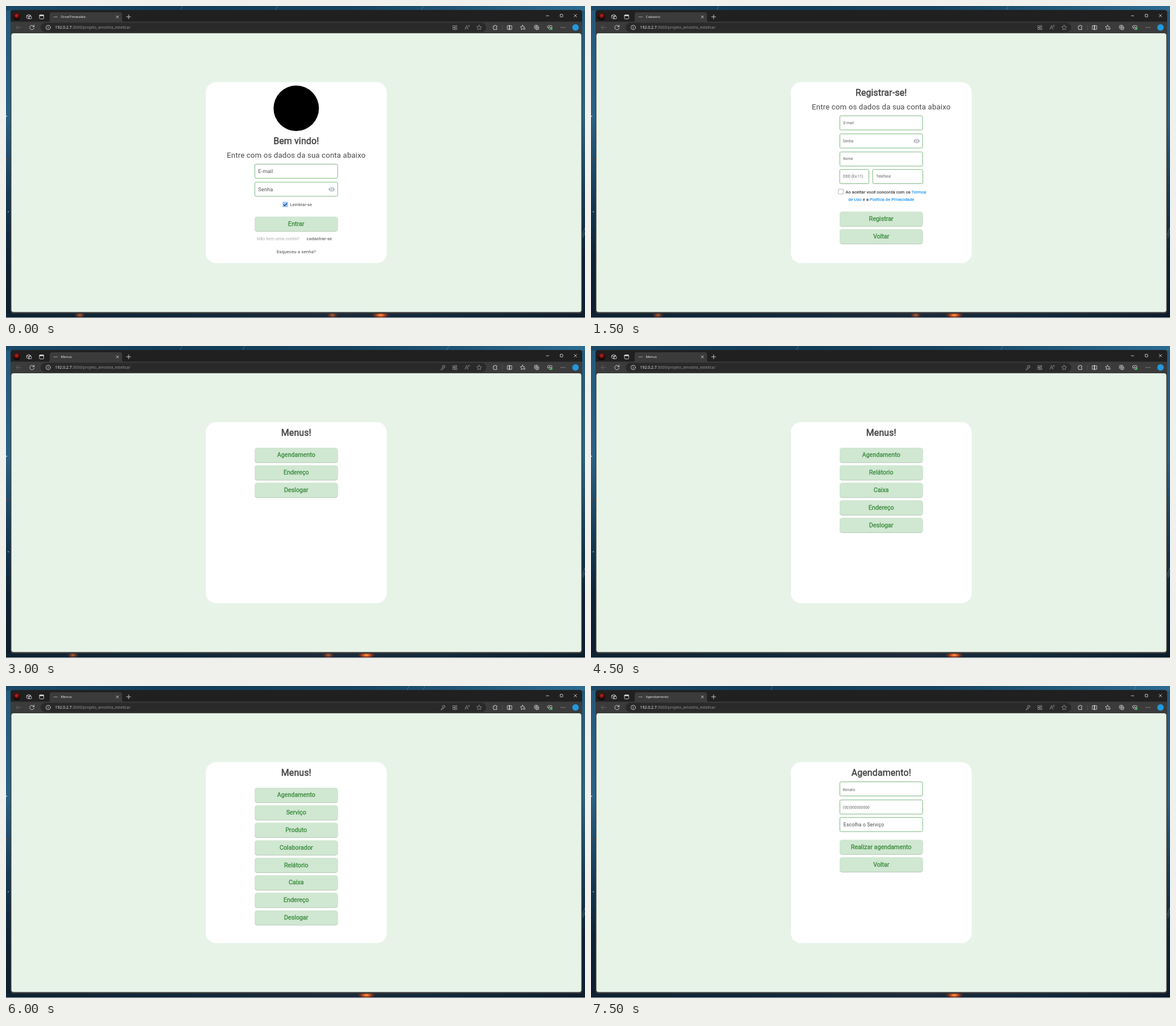
Write an HTML page that moves like this. It is 1020 by 549 pixels and loops after 9000 ms.

```html
<!DOCTYPE html>
<html lang="pt-BR">
<head>
<meta charset="utf-8">
<title>Agendamento</title>
<style>
  html, body { margin: 0; width: 100%; height: 100%; overflow: hidden; background: #0d2233; }
  svg { display: block; width: 100%; height: 100%; }
  text { font-family: Roboto, sans-serif; fill: currentColor; white-space: pre; }
  .ui text, text.ui { font-family: "Open Sans", "Noto Sans", sans-serif; }
  .bold { stroke: currentColor; stroke-width: .032em; stroke-linejoin: round; }
  .mid { text-anchor: middle; }
  .title { font-size: 15.94px; letter-spacing: .133px; color: #444; }
  .sub { font-size: 13.28px; letter-spacing: .133px; color: #4a4a4a; }
  .btn { font-size: 10.625px; letter-spacing: .053px; color: #388a3c; }
  .label { font-size: 9.3px; letter-spacing: .14px; color: #555; }
  .select { font-size: 8.5px; letter-spacing: .266px; color: #444; }
  .small { font-size: 6.375px; letter-spacing: .15px; color: #5c5c5c; }
  .value { font-size: 6.375px; letter-spacing: .26px; color: #5c5c5c; }
  .note { font-size: 7.44px; letter-spacing: .133px; color: #444; }
  .link { font-size: 7.97px; letter-spacing: .06px; color: #4a4a4a; }
  .blue { color: #2196f3; }
  .tab { font-size: 6.1px; color: #f2f2f2; }
  .icon { fill: none; stroke: #d8d8d8; stroke-width: .9; stroke-linecap: round; stroke-linejoin: round; }
  .dim { stroke: #8e8e8e; }
  .scene { visibility: hidden; animation: show 9s step-end infinite; animation-delay: calc(var(--i) * 1.5s); }
  @keyframes show {
    0% { visibility: visible; }
    16.666%, 100% { visibility: hidden; }
  }
</style>
</head>
<body>
<svg viewBox="0 0 1020 549" preserveAspectRatio="none">
  <defs>
    <linearGradient id="side" x2="0" y2="1">
      <stop offset="0" stop-color="#24597c"/>
      <stop offset=".35" stop-color="#2a6285"/>
      <stop offset=".6" stop-color="#173c58"/>
      <stop offset=".8" stop-color="#0d2336"/>
      <stop offset="1" stop-color="#0d1d2c"/>
    </linearGradient>
    <linearGradient id="sky">
      <stop offset="0" stop-color="#1b4a69"/>
      <stop offset=".3" stop-color="#123c58"/>
      <stop offset=".6" stop-color="#15435f"/>
      <stop offset="1" stop-color="#2c6c92"/>
    </linearGradient>
    <linearGradient id="ground">
      <stop offset="0" stop-color="#0e2231"/>
      <stop offset=".3" stop-color="#10283a"/>
      <stop offset=".55" stop-color="#1b2a39"/>
      <stop offset=".75" stop-color="#122a3c"/>
      <stop offset="1" stop-color="#0c1d2b"/>
    </linearGradient>
    <radialGradient id="fire">
      <stop offset="0" stop-color="#ffae4a"/>
      <stop offset=".35" stop-color="#d4511f"/>
      <stop offset="1" stop-color="#6b2216" stop-opacity="0"/>
    </radialGradient>
    <radialGradient id="avatar" cy=".35">
      <stop offset="0" stop-color="#d02a20"/>
      <stop offset=".45" stop-color="#7d1512"/>
      <stop offset="1" stop-color="#120708"/>
    </radialGradient>
  </defs>

  <rect width="1020" height="549" fill="url(#side)"/>
  <rect width="1020" height="8" fill="url(#sky)"/>
  <rect y="540" width="1020" height="9" fill="url(#ground)"/>
  <g id="wall"></g>
  <rect y="548.2" width="1020" height=".8" fill="#e6e9eb"/>

  <!-- browser window -->
  <rect x="8" y="7" width="1007" height="534" rx="4.5" fill="#3b3b3b"/>
  <path d="M8 27.500V11.500a4.500 4.500 0 0 1 4.500-4.500H1010.500a4.500 4.500 0 0 1 4.500 4.500V27.500Z" fill="#202020"/>
  <path d="M74 28q3 0 3-3V14.500q0-3.500 3.500-3.500H201q3.500 0 3.500 3.500V25q0 3 3 3Z" fill="#3b3b3b"/>
  <rect x="61" y="29.500" width="785" height="16.500" rx="8.250" fill="#292929"/>
  <circle cx="18.700" cy="18.700" r="6.300" fill="url(#avatar)"/>

  <g class="icon">
    <path d="M36.700 16.700l3.300-1.700 3.300 1.700v4.200l-3.300 1.700-3.300-1.700ZM36.700 16.700l3.300 1.700v4.200M40 18.400l3.300-1.700"/>
    <rect x="40.800" y="18" width="4" height="4.600" rx="1" fill="#202020"/>
    <rect x="59" y="15.500" width="7.500" height="7.300" rx="1.500"/>
    <path d="M59.400 16.700H66" stroke-width="2"/>
    <path d="M84 19.200H90.500" stroke="#aaa"/>
    <path d="M194.300 17.200l4 4m0-4l-4 4M212.300 19h7.400M216 15.300v7.400"/>
    <path d="M951.800 17.200h4.400M1000.800 14.700l4.600 4.600m0-4.600l-4.600 4.600"/>
    <rect x="976.300" y="14.700" width="4.500" height="4.500" rx=".7"/>
    <path d="M26.200 37.800H18m3.700-3.700L18 37.800l3.700 3.700" stroke="#6a6a6a"/>
    <path d="M49.300 36.200a3.900 3.900 0 1 0 .3 2.600M49.600 33.700v2.700h-2.700"/>
    <circle cx="74.300" cy="37.800" r="3.900"/>
    <path d="M74.300 37.500v2M74.300 35.800v.1"/>
  </g>
  <g class="icon dim">
    <path d="M787.500 34.700h3v3h-3ZM787.500 38.500h3v3h-3ZM791.500 38.500h3v3h-3ZM793 33.800v3.400M791.300 35.500h3.400"/>
    <path d="M808.500 41l2.800-7 2.800 7M809.500 38.800h3.600M814.300 34.200q1 .8 0 1.800M815.700 33.400q1.600 1.700 0 3.400" stroke-width=".8"/>
    <path d="M833.500 33.600l1.300 2.700 3 .4-2.200 2.100.5 3-2.600-1.400-2.600 1.400.5-3-2.200-2.100 3-.4Z"/>
  </g>
  <g class="icon">
    <path d="M859 35h1.700a1.200 1.200 0 1 1 2.400 0h1.700v2a1.200 1.200 0 1 0 0 2.400v2H859v-2a1.200 1.200 0 1 1 0-2.400Z"/>
    <path d="M874.600 33.500v8.500" stroke="#606060" stroke-width=".6"/>
    <path d="M883.500 34.800h3.500v6.200h-3.500ZM887 34.800h4V41h-4ZM887 33.700v8.400"/>
    <path d="M910 33.800l1.100 2.500 2.500.3M910 33.800l-1.100 2.500-2.700.4 2 2-.5 2.800 2.300-1.200M911.300 39h3.500M911.300 41h3"/>
    <rect x="933" y="35.700" width="5.500" height="5.800" rx="1"/>
    <path d="M931 39.500v-4.200q0-1.300 1.300-1.300h4M935.700 37v3.200M934.100 38.600h3.200"/>
    <path d="M958 41.500l-3.600-3.600a2.200 2.200 0 0 1 3.600-2.700 2.200 2.200 0 0 1 3.600 2.700ZM955 38h1.800l1-1.500 1.200 2.300.7-.8h1.500"/>
    <path d="M978 37.800h.1M981.200 37.800h.1M984.400 37.800h.1" stroke-width="1.300"/>
  </g>
  <circle cx="960.800" cy="40.300" r="2" fill="#42b657"/>
  <circle cx="1003.300" cy="37.700" r="5.700" fill="#2299dc"/>

  <text class="ui" x="86.600" y="40.200" font-size="6.900" color="#9a9a9a"><tspan fill="#f4f4f4">192.0.2.7</tspan>:3000/projeto_amostra_estetica/</text>

  <!-- page -->
  <rect x="9.500" y="48" width="1004" height="490.500" rx="4" fill="#e8f3e8"/>
  <rect x="352" y="134" width="318.700" height="318.500" rx="18" fill="#fff"/>
  <g id="page"></g>
</svg>

<script>
  const CX = 511.3;

  const text = (cls, x, y, s) => `<text class="${cls}" x="${x}" y="${y}">${s}</text>`;
  const title = (s, y = 157.6) => text('title bold mid', CX, y, s);
  const subtitle = y => text('sub mid', CX, y, 'Entre com os dados da sua conta abaixo');
  const tab = s => text('ui tab', 96.6, 21.3, s);

  const button = (y, s) => `
    <rect x="438" y="${y + .7}" width="146.600" height="26" rx="4.500" fill="#b5c9b6"/>
    <rect x="438" y="${y}" width="146.600" height="25.700" rx="4.500" fill="#d0e7d1"/>
    ${text('btn bold mid', CX, y + 16.3, s)}`;

  const buttons = (y, names) => names.map((s, i) => button(y + i * 30.81, s)).join('');

  const field = (y, cls, s, dx = 5.6, dy = 16, x = 438.4, w = 145.8) => `
    <rect x="${x}" y="${y}" width="${w}" height="24.900" rx="2" fill="#fff" stroke="#7db681"/>
    ${text(cls, x + dx, y + dy, s)}`;

  const eye = y => `<g transform="translate(573.7 ${y})">
    <path d="M-5.700 0Q-3.600-3.900 0-3.900T5.700 0Q3.600 3.900 0 3.900T-5.700 0Z" fill="#b0b8bf"/>
    <circle r="2.050" fill="#b0b8bf" stroke="#fff" stroke-width="1.100"/></g>`;

  const key = `<g class="icon dim"><circle cx="771" cy="36.300" r="2.300"/>
    <path d="M769.300 38l-3 3v1h1.700l.8-1.200 1.300-.4.500-1.700M771.700 35.600h.1"/></g>`;

  const login = tab('OrvelTimetable') +
    `<circle cx="${CX}" cy="180" r="40" fill="#000"/>` +
    title('Bem vindo!', 242.6) + subtitle(267.3) +
    field(278.2, 'label', 'E-mail') + field(310, 'label', 'Senha') + eye(322.6) +
    `<rect x="487.200" y="344.400" width="9.500" height="9.500" rx=".5" fill="#a3c8f5"/>
     <path d="M488.800 349.200l2.300 2.300 4.200-4.600" fill="none" stroke="#173f80" stroke-width="1.300"/>` +
    text('note', 500.4, 351.8, 'Lembrar-se') +
    button(370.4, 'Entrar') +
    `<g style="--c:#bdbdbd"><text class="link bold" style="color:#c2c2c2" x="441.700" y="412.300">Não tem uma conta?</text></g>` +
    text('link', 529.5, 412.3, 'cadastrar-se') +
    text('link mid', CX, 434.8, 'Esqueceu a senha?');

  const blue = s => `<tspan class="blue bold">${s}</tspan>`;
  const signup = tab('Cadastro') + title('Registrar-se!') + subtitle(182.3) +
    field(193.2, 'small', 'E-mail', 6.2, 14.6) +
    field(225, 'small', 'Senha', 5.4, 14.6) + eye(237.6) +
    field(256.8, 'small', 'Nome', 5.6, 14.6) +
    field(287.7, 'small', 'DDD (Ex:11)', 6, 14.6, 438.1, 51.4) +
    field(287.7, 'small', 'Telefone', 6.2, 14.6, 496.3, 88.3) +
    '<rect x="435.900" y="322.300" width="8.600" height="8.600" rx=".6" fill="#fff" stroke="#b4b4b4"/>' +
    text('note bold', 448.5, 329.5, 'Ao aceitar você concorda com os ' + blue('Termos')) +
    text('note bold mid', CX, 343.2, blue('de Uso') + ' e a ' + blue('Política de Privacidade')) +
    buttons(361.8, ['Registrar', 'Voltar']);

  const menu = names => tab('Menus') + key + title('Menus!') + buttons(179, names);

  const booking = tab('Agendamento') + key + title('Agendamento!') +
    field(168.6, 'value', 'Renato', 5.4, 15.9) +
    field(200.4, 'value', '(00)000000000', 5.4, 15.9) +
    field(231.3, 'select', 'Escolha o Serviço', 6.4, 15.4) +
    buttons(270.4, ['Realizar agendamento', 'Voltar']);

  const pages = [
    login,
    signup,
    menu(['Agendamento', 'Endereço', 'Deslogar']),
    menu(['Agendamento', 'Relátorio', 'Caixa', 'Endereço', 'Deslogar']),
    menu(['Agendamento', 'Serviço', 'Produto', 'Colaborador', 'Relátorio', 'Caixa', 'Endereço', 'Deslogar']),
    booking
  ];

  // Wallpaper glimpses around the window: glow centres below, rain streaks above.
  const glows = [[130, 575, 660], [118, 572, 640], [118, 568, 635], [640], [635], [640]];
  const rain = [[311, 478, 735], [225, 735], [310, 420, 780], [365, 725], [710, 738], [320, 960]];
  const glow = x => `<ellipse cx="${x}" cy="544" rx="${x > 600 ? 17 : 11}" ry="6" fill="url(#fire)" opacity="${x > 600 ? 1 : .55}"/>`;
  const streak = x => `<path d="M${x} 0l-3 7" stroke="#7fa9c4" stroke-width=".7" opacity=".6"/>`;
  const walls = glows.map((g, i) => g.map(glow).join('') + rain[i].map(streak).join('') +
    `<circle cx="1" cy="194" r="1" fill="#c8dbe6"/><circle cx="4" cy="362" r="1" fill="#8fb2c6"/>
     <circle cx="1.500" cy="270" r="2" fill="#7a3a30" opacity=".6"/>
     <path d="M1015 404l5-14M1016 408l4-10" stroke="#8ba0ae" stroke-width=".8" opacity=".7"/>`);

  const mount = (id, list) => {
    document.getElementById(id).innerHTML =
      list.map((s, i) => `<g class="scene" style="--i:${i}">${s}</g>`).join('');
  };
  mount('wall', walls);
  mount('page', pages);
</script>
</body>
</html>
```
